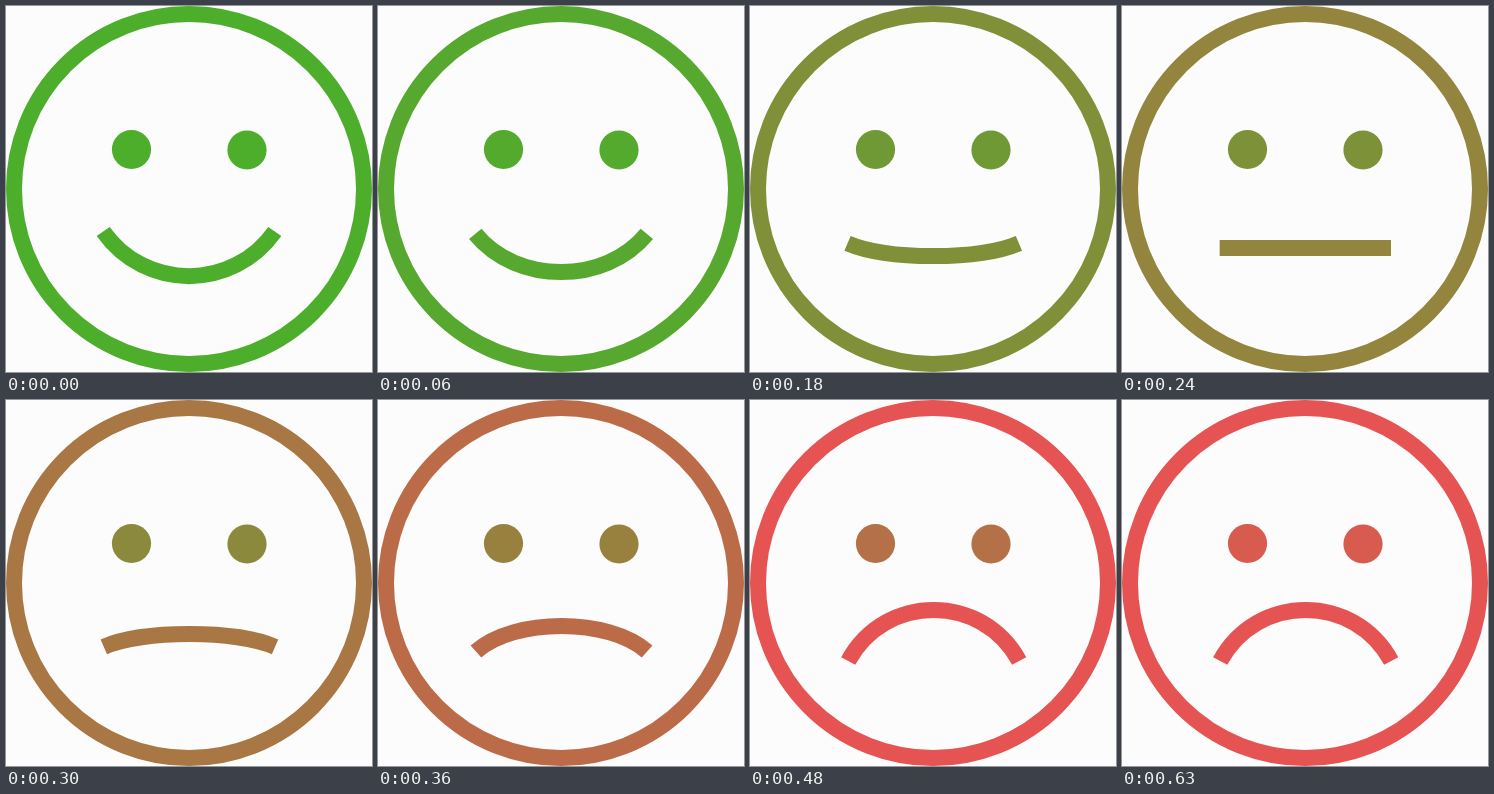
An HTML page for the animation above (0.66 s loop, 366 by 366 pixels).

```html
<!DOCTYPE html>
<html lang="en">
<head>
<meta charset="utf-8">
<title>Mood face</title>
<style>
  :root { --happy: #4cae2b; --sad: #e55353; }
  html, body { margin: 0; height: 100%; overflow: hidden; background: #fcfcfc; }
  svg { display: block; width: 100%; height: 100%; }

  .line {
    fill: none;
    stroke: var(--happy);
    stroke-width: 16;
    animation: mood 660ms steps(15) infinite;
  }
  .mouth {
    d: path("M97.2 225.5C139.2 285 226.8 285 268.8 225.5");
    animation-name: mood, frown;
  }
  .eyes {
    fill: var(--happy);
    animation: eyes 660ms steps(21) infinite;
  }

  /* Everything holds for one 30 ms tick, then advances tick by tick. */
  @keyframes mood {
    0%, 4.5454% { stroke: var(--happy); }
    72.7272%, 100% { stroke: var(--sad); }
  }
  @keyframes frown {
    0%, 4.5454% { d: path("M97.2 225.5C139.2 285 226.8 285 268.8 225.5"); }
    72.7272%, 100% { d: path("M98.2 261C135 193 232.4 193 269.2 261"); }
  }
  /* The eyes are slower and never quite reach the full red. */
  @keyframes eyes {
    0%, 4.5454% { fill: var(--happy); }
    100% { fill: rgb(222, 87, 81); }
  }
</style>
</head>
<body>
<svg viewBox="0 0 366 366">
  <circle class="line" cx="183" cy="183" r="175"/>
  <g class="eyes">
    <circle cx="125.5" cy="143.5" r="19.6"/>
    <circle cx="241" cy="144" r="19.6"/>
  </g>
  <path class="line mouth" d="M97.2 225.5C139.2 285 226.8 285 268.8 225.5"/>
</svg>
</body>
</html>
```
